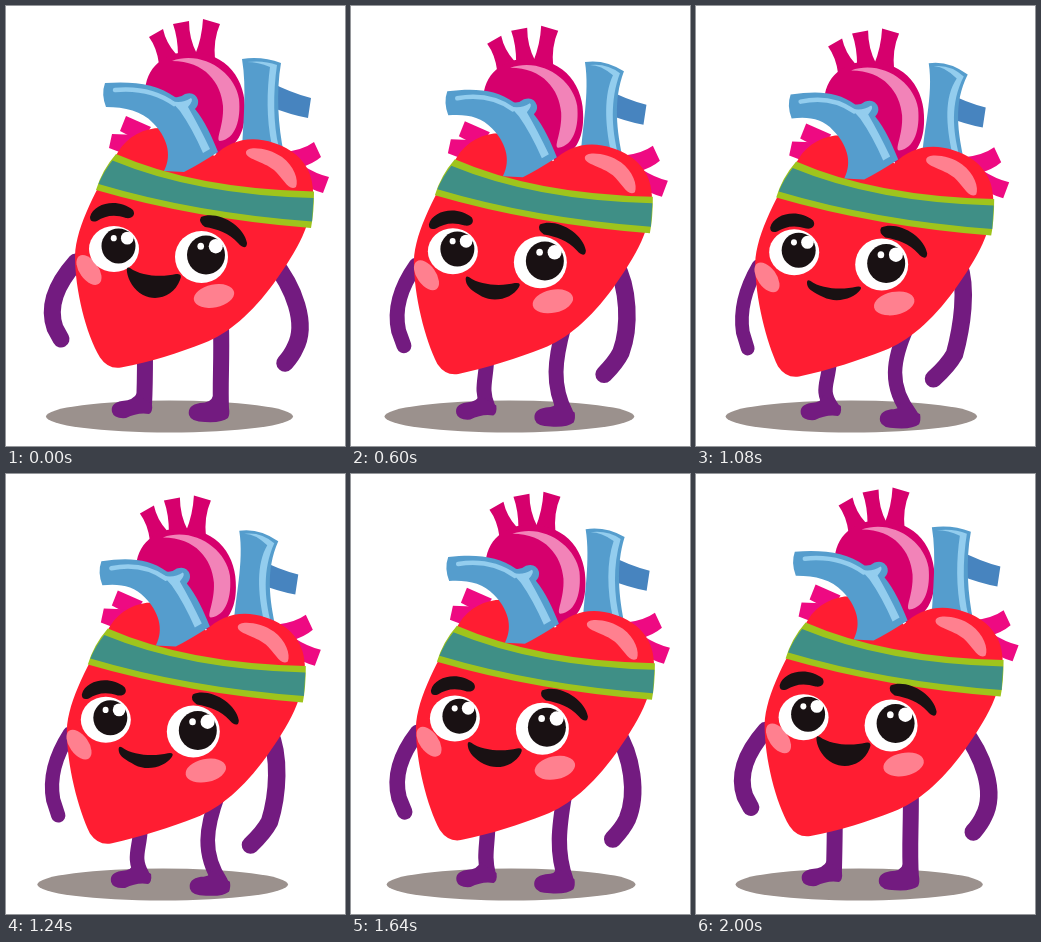
These frames come from a looping animation (339 px wide and 440 px high, 2.04 s). An HTML page with a canvas:

```html
<!DOCTYPE html>
<html lang="en">
<head>
<meta charset="utf-8">
<title>Cheerful heart</title>
<style>
html, body { margin: 0; width: 100%; height: 100%; overflow: hidden; background: #fff; }
canvas { display: block; width: 339px; height: 440px; }
</style>
</head>
<body>
<canvas id="stage"></canvas>
<script>
const W = 339, H = 440, STEP = 40, FRAMES = 51;
const canvas = document.getElementById('stage');
const ctx = canvas.getContext('2d');
const dpr = window.devicePixelRatio || 1;
canvas.width = W * dpr;
canvas.height = H * dpr;

const RED = '#ff1d32', PURPLE = '#731b80', MAGENTA = '#d6006d', PINK = '#ee0a82',
  BLUE = '#559dcd', SKY = '#93cdee', NAVY = '#4784bf', TEAL = '#3f8f86',
  LIME = '#9fc41c', CHEEK = '#ff808f', ROSE = '#f283b8', BLACK = '#191113', GREY = '#9b918d';

function fill(d, color) {
  ctx.fillStyle = color;
  ctx.fill(new Path2D(d));
}

function stroke(d, color, width) {
  ctx.strokeStyle = color;
  ctx.lineWidth = width;
  ctx.lineCap = ctx.lineJoin = 'round';
  ctx.stroke(new Path2D(d));
}

function oval(x, y, rx, ry, color, angle = 0) {
  ctx.fillStyle = color;
  ctx.beginPath();
  ctx.ellipse(x, y, rx, ry, angle, 0, Math.PI * 2);
  ctx.fill();
}

function shifted(x, y, draw) {
  ctx.save();
  ctx.translate(x, y);
  draw();
  ctx.restore();
}

// u: linear sway, v: sway with a quicker start
function drawLimbs(u, v) {
  const p = (x, dx, y, dy) => `${x + dx * u} ${y + dy * v} `;
  const legWidth = 16 - 1.5 * u;

  stroke('M' + p(70, -7, 256, 4) + 'C' + p(45, 2, 284, 2) + p(43, 1, 305, 3) +
    p(49, -2, 322, 4) + 'L' + p(55, -3, 333, 9), PURPLE, 17 - 3 * u);
  stroke('M' + p(266, -3, 254, 4) + 'C' + p(288, -15, 281, 1) + p(302, -33, 318, 3) +
    p(289, -28, 342, 6) + 'Q' + p(286, -31, 349, 10) + p(279, -38, 357, 15), PURPLE, 17.5);

  stroke('M' + p(139, -5, 348, 8) + 'C' + p(139, -6, 368, 8) + p(139, -14, 380, 4) +
    p(138, -2, 399, 2), PURPLE, legWidth);
  shifted(-u, 2 * v, () => fill('M' + p(131, -3, 387, 0) + 'Q128 394 116 395 Q104 397 106 406 ' +
    'Q108 413 120 412 Q132 406 143 408 Q147 406 146 398 Z', PURPLE));

  stroke('M' + p(215, -3, 320, 0) + 'C' + p(216, -18, 354, 0) + p(214, -20, 376, 4) +
    p(215, 0, 403, 6), PURPLE, legWidth);
  shifted(u, 6 * v, () => fill('M' + p(207, -4, 390, 0) + 'Q205 397 194 397 Q181 399 183 409 ' +
    'Q185 416 199 416 Q216 417 222 412 Q224 408 223 402 Z', PURPLE));
}

function drawBackVessels(u, v) {
  fill('M120 110 L145 121 L135 136 L114 125 Z', PINK);
  fill('M106 128 L132 129 L116 147 L103 142 Z', PINK);
  shifted(0, -2 * v, () => {
    fill('M278 146 Q297 144 308 136 L315 151 Q307 158 293 162 Z', PINK);
    fill('M296 159 Q310 168 323 171 L317 187 Q305 184 296 176 Z', PINK);
  });

  shifted(-u, 2 * v, () => {
    fill('M143 31 L157 23 Q160 37 170 48 L153 58 Q151 42 143 31 Z', MAGENTA);
    fill('M167 18 L183 15 Q183 33 191 48 L172 50 Q172 32 167 18 Z', MAGENTA);
    fill('M197 13 L214 18 Q207 34 209 54 L189 49 Q196 32 197 13 Z', MAGENTA);
    fill('M139 88 C139 61 159 46 183 46 C222 46 240 75 239 105 C239 126 231 141 212 149 L170 112 Z', MAGENTA);
    fill('M166 55 C196 44 229 66 233 93 C235 113 230 133 214 135 ' +
      'C209 134 218 120 217 100 C215 77 199 55 166 55 Z', ROSE);
  });

  // the right tube flares and leans at its mouth
  const tx = 6 * u, lt = -3 * v, rt = 4 * v;
  shifted(-5 * u, 2 * v, () => fill('M262 75 Q285 87 305 92 L302 112 Q285 109 262 100 Z', NAVY));
  fill(`M${236 + tx} ${53 + lt} Q${256 + tx} ${50 + lt} ${275 + tx} ${57 + rt}
    C${270 - tx / 2} ${86 + rt} 272 120 278 148 L236 145 C237 118 ${241 + tx} 82 ${236 + tx} ${53 + lt} Z`, BLUE);
  fill(`M${241 + tx} ${56 + lt} Q${258 + tx} ${54 + lt} ${271 + tx} ${59 + rt}
    C${267 - tx / 2} ${86 + rt} 267 118 273 142 L266 140 C260 112 ${261 - tx / 2} 84 ${264 + tx} ${61 + rt}
    Q${252 + tx} ${56 + lt} ${241 + tx} ${56 + lt} Z`, SKY);
}

function drawHeart(v) {
  const x = 107 - 2 * v, y = 361.5 + 1.5 * v;
  fill(`M112 146 C124 126 146 119 166 123 C184 127 199 137 208 150
    C224 134 245 129 268 137 C292 145 306 161 307 184
    C308 215 291 245 268 277 C246 307 222 328 198 337
    C172 347 145 356 ${x + 8} ${y} Q${x - 5} ${y + 2} ${x - 13} ${y - 10}
    C80 328 69 284 69 250 C70 219 92 181 112 146 Z`, RED);
  fill('M240 146 C241 139 264 142 276 151 C288 160 293 174 290 181 ' +
    'C283 186 277 172 268 164 C257 155 239 153 240 146 Z', CHEEK);
}

function drawFrontVessel(u, v) {
  const ex = 5 * u, ey = 4 * v;
  fill(`M${99 + ex} ${77 + ey} C${128 + ex / 2} ${75 + ey / 2} 151 78 169 91
    Q174 92 179 88 Q189 85 192 94 Q193 99 189 103 C199 115 206 131 212 146
    Q192 159 178 166 L158 165 C167 148 160 130 147 117
    C136 105 ${119 + ex / 2} ${101 + ey / 2} ${100 + ex} ${101 + ey}
    Q${95 + ex} ${88 + ey} ${99 + ex} ${77 + ey} Z`, BLUE);
  stroke(`M${109 + ex} ${84 + ey} C${130 + ex / 2} ${82 + ey / 2} 151 86 168 98`, SKY, 4.5);
  fill('M165 95 Q176 98 185 92 Q188 94 182 101 Q193 120 204 143 L197 147 Q186 122 174 105 Z', SKY);
}

function drawBand() {
  fill('M110 148 Q190 183 308 185.5 Q308 207 305 222 Q190 213 90 184 Q96 164 110 148 Z', LIME);
  fill('M106.5 154.5 Q190 189 307.5 192 L306 215.5 Q190 207 92.5 178 Q98 165 106.5 154.5 Z', TEAL);
}

function drawEye(x, y, rx, ry, px, py, pr) {
  oval(x, y, rx, ry, '#fff');
  oval(px, py, pr - 0.5, pr, BLACK);
  oval(px + pr * 0.5, py - pr * 0.45, pr * 0.36, pr * 0.37, '#fff');
  oval(px - pr * 0.27, py - pr * 0.45, pr * 0.17, pr * 0.18, '#fff');
}

function drawFace(u, v) {
  oval(83 - 2 * u, 264, 17, 9.5, CHEEK, 0.95);
  oval(208, 290, 20.5, 11.5, CHEEK, -0.2);
  shifted(0, -4 * v, () => drawEye(108, 243, 25, 23, 112.5, 240 + v, 17.5));
  drawEye(195.5, 251, 26.5, 26, 200, 249 + v, 19.5);

  shifted(0, 3 * v, () => {
    fill('M84 211 C88 196 113 192 127 204 C130 209 126 213 120 212 ' +
      'C108 208 99 210 91 215 Q84 217 84 211 Z', BLACK);
    fill('M195 211 C211 204 238 219 241 237 C241 243 236 242 232 237 ' +
      'C223 227 211 223 199 221 Q192 216 195 211 Z', BLACK);
  });

  const top = 5 * v, low = -5 * v;
  fill(`M124 ${262 + top} C136 ${271 + top} 158 ${271 + top} 170 ${268 + top}
    Q177 ${267 + top} 174 ${274 + top / 2} C168 ${290 + low} 151 ${296 + low} 137 ${289 + low}
    C128 ${284 + low} 122 ${274 + top / 2} 121 ${266 + top} Q120 ${260 + top} 124 ${262 + top} Z`, BLACK);
}

function draw(now) {
  const i = Math.floor((now % (STEP * FRAMES)) / STEP);
  const u = Math.min(i, FRAMES - i) / 22;
  const v = u * (1.35 - 0.35 * u);

  ctx.setTransform(dpr, 0, 0, dpr, 0, 0);
  ctx.fillStyle = '#fff';
  ctx.fillRect(0, 0, W, H);

  oval(163.5 - 7.5 * u, 410.5, 123.5 + 2 * u, 16, GREY);
  drawLimbs(u, v);
  shifted(-9 * u, 7 * v, () => {
    drawBackVessels(u, v);
    drawHeart(v);
    drawFrontVessel(u, v);
    drawBand();
    drawFace(u, v);
  });
}

function loop(now) {
  draw(now);
  requestAnimationFrame(loop);
}

draw(0);
requestAnimationFrame(loop);
</script>
</body>
</html>
```
